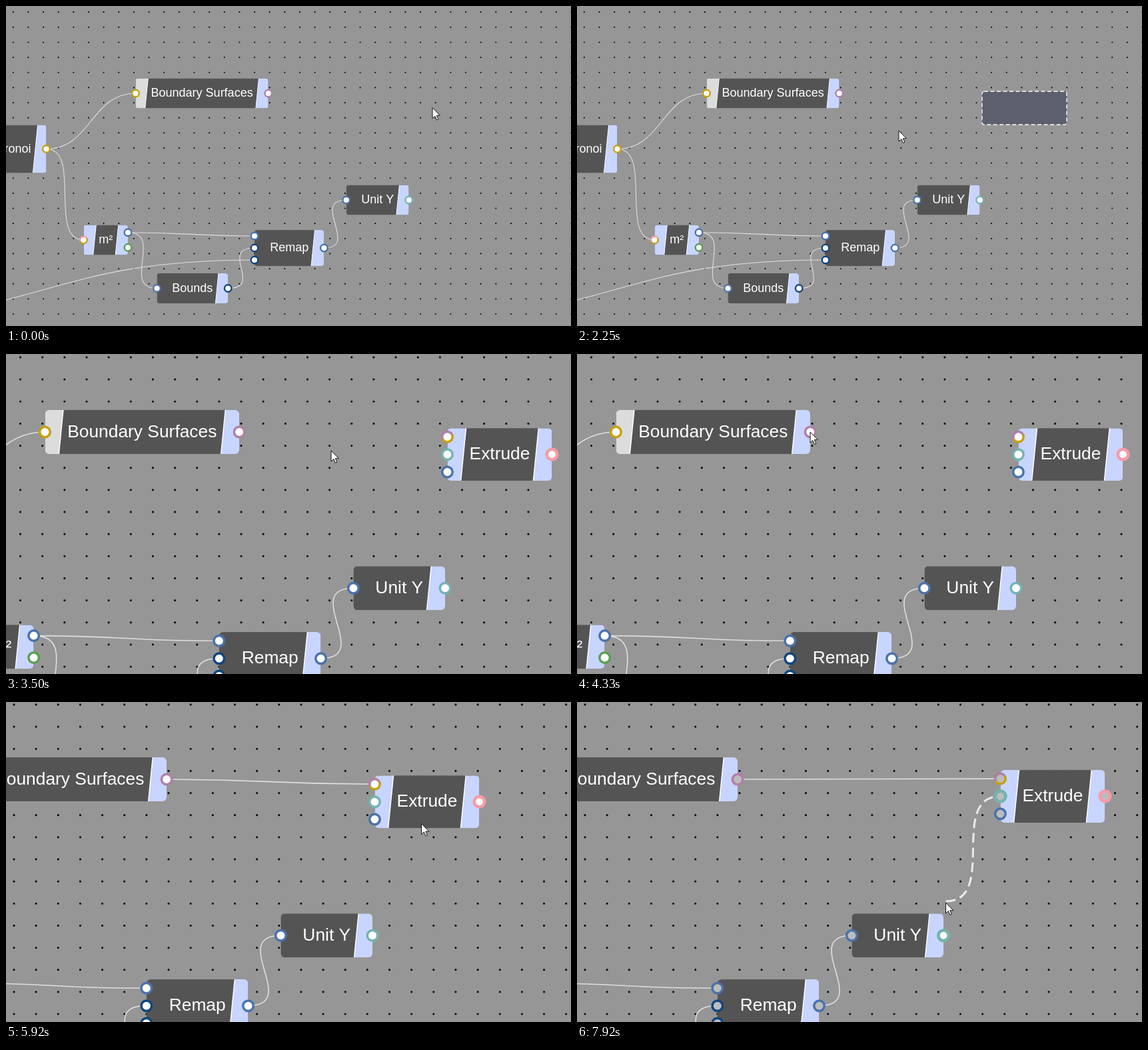
Animation, 848 px wide and 480 px high, one loop 8 s. Source, as an HTML page with a canvas:

```html
<!DOCTYPE html>
<html lang="en">
<head>
<meta charset="utf-8">
<title>Node editor</title>
<style>
  html, body { margin: 0; width: 100%; height: 100%; overflow: hidden; background: #969696; }
  canvas { display: block; }
</style>
</head>
<body>
<canvas id="stage" width="848" height="480"></canvas>
<script>
const ctx = document.getElementById('stage').getContext('2d');
const LOOP = 8000;
const FONT = '"Liberation Sans", Arial, sans-serif';
const BLUE = '#4a72aa', NAVY = '#10457f', GOLD = '#c6a10c', MAUVE = '#b27fa6',
      TEAL = '#74b3ae', GREEN = '#57a051', PINK = '#f59ca6', PANEL = '#c8d5ff', PALE = '#dcdcdc';

// x is the left edge, y the vertical centre; a colour pair is a two-tone port.
const node = (name, x, y, w, h, ins, outs, panel) => ({ name, x, y, w, h, ins, outs, panel });
const voronoi = node('Voronoi', -46.5, 214.5, 107, 72, [], [GOLD]);
const boundary = node('Boundary Surfaces', 194.5, 131, 199.2, 45, [GOLD], [MAUVE], PALE);
const area = node('m²', 116.5, 351, 66.5, 45, [[PINK, GOLD]], [BLUE, GREEN], PANEL);
const bounds = node('Bounds', 226.5, 423.5, 106.7, 45, [BLUE], [NAVY]);
const remap = node('Remap', 373, 363, 104.3, 54, [BLUE, NAVY, NAVY], [BLUE]);
const unitY = node('Unit Y', 510.7, 291, 94, 45, [BLUE], [TEAL]);
const extrude = node('Extrude', 607, 154, 107.3, 54, [[MAUVE, GOLD], TEAL, BLUE], [PINK], PANEL);
const EXTRUDE_HOME = { x: extrude.x, y: extrude.y };

const MENU_ITEMS = ['Absolute', 'Amplitude', 'Angle', 'ArcCosine', 'ArcSED', 'ArcSine', 'ArcTangent',
  'Area', 'Average', 'Boolean', 'BoundarySurfaces', 'Ceil', 'Circle'];

const TIME = { menu: 500, filter: 1250, pick: 1420, created: 2330, connected: 5420 };
const ZOOM_STEPS = [3170, 3250, 3330, 3420];

// time, x, y of the pointer
const POINTER = [
  [80, 640, 152.5], [420, 607.5, 127.5], [1420, 607.5, 127.5], [1830, 483, 187],
  [3170, 483, 187], [3500, 488, 145], [3600, 488, 145], [4170, 350, 117], [4670, 350, 117],
  [5080, 561.5, 103], [5340, 662, 124], [5420, 662, 124], [5580, 789, 279], [5750, 680, 278],
  [5920, 623.5, 182.5], [6170, 623.5, 182.5], [6750, 705.5, 174.5], [7250, 635, 142],
  [7420, 635, 142], [7920, 553.5, 301]
];

const progress = (t, a, b) => Math.min(1, Math.max(0, (t - a) / (b - a)));

function pointerAt(t) {
  const next = POINTER.findIndex(k => k[0] > t);
  if (next < 0) return POINTER[POINTER.length - 1].slice(1);
  if (next === 0) return POINTER[0].slice(1);
  const a = POINTER[next - 1], b = POINTER[next], p = progress(t, a[0], b[0]);
  return [a[1] + (b[1] - a[1]) * p, a[2] + (b[2] - a[2]) * p];
}

function viewAt(t) {
  const scale = 1.1 ** ZOOM_STEPS.filter(s => s <= t).length;
  const pan = progress(t, 5580, 5750);
  return { scale, x: 487.6 * (1 - scale) - 109 * pan, y: 161.2 * (1 - scale) - pan };
}

function portPosition(n, side, i) {
  const count = n[side].length;
  return [side === 'ins' ? n.x : n.x + n.w, n.y + (i - (count - 1) / 2) * n.h / count];
}
const input = (n, i = 0) => portPosition(n, 'ins', i);
const output = (n, i = 0) => portPosition(n, 'outs', i);

function drawGrid(view) {
  const gap = 22.64;
  ctx.fillStyle = '#0c0c0c';
  ctx.beginPath();
  for (let x = 10.8; x * view.scale + view.x < 850; x += gap) {
    for (let y = 9.2; y * view.scale + view.y < 482; y += gap) {
      ctx.moveTo(x + 1.1, y);
      ctx.arc(x, y, 1.1, 0, 7);
    }
  }
  ctx.fill();
}

function drawLink([x1, y1], [x2, y2], dashed) {
  const reach = Math.max(54, (x2 - x1) / 2);
  ctx.save();
  ctx.strokeStyle = dashed ? '#e8e8e8' : '#dedede';
  ctx.lineWidth = dashed ? 2.1 : 1.1;
  if (dashed) ctx.setLineDash([10, 5]);
  ctx.beginPath();
  ctx.moveTo(x1, y1);
  ctx.bezierCurveTo(x1 + reach, y1, x2 - reach, y2, x2, y2);
  ctx.stroke();
  ctx.restore();
}

function drawPort([x, y], color, dim, bold) {
  if (Array.isArray(color)) {
    const blend = ctx.createLinearGradient(x - 2, y - 4, x + 2, y + 4);
    blend.addColorStop(0.35, color[0]);
    blend.addColorStop(0.6, color[1]);
    color = blend;
  }
  ctx.beginPath();
  ctx.arc(x, y, 5.3, 0, 7);
  ctx.fillStyle = dim ? '#bcbcbc' : '#fff';
  ctx.fill();
  ctx.strokeStyle = color;
  ctx.lineWidth = bold ? 3.2 : 2.4;
  ctx.stroke();
}

function drawPanel(n, edge, direction, color) {
  const top = n.y - n.h / 2, bottom = n.y + n.h / 2, lean = n.h * 0.05;
  const inner = edge + direction * 16.5;
  ctx.fillStyle = color;
  ctx.beginPath();
  ctx.moveTo(edge, top);
  ctx.lineTo(inner + lean, top);
  ctx.lineTo(inner - lean, bottom);
  ctx.lineTo(edge, bottom);
  ctx.fill();
  ctx.strokeStyle = '#fff';
  ctx.lineWidth = 1;
  ctx.beginPath();
  ctx.moveTo(inner + lean, top);
  ctx.lineTo(inner - lean, bottom);
  ctx.stroke();
}

function drawNode(n, drag) {
  ctx.save();
  ctx.beginPath();
  ctx.roundRect(n.x, n.y - n.h / 2, n.w, n.h, 4);
  ctx.clip();
  ctx.fillStyle = '#545454';
  ctx.fillRect(n.x, n.y - n.h / 2, n.w, n.h);
  if (n.panel) drawPanel(n, n.x, 1, n.panel);
  drawPanel(n, n.x + n.w, -1, PANEL);
  ctx.restore();

  ctx.fillStyle = '#fff';
  ctx.font = `18px ${FONT}`;
  ctx.textAlign = 'center';
  ctx.fillText(n.name, n.x + n.w / 2, n.y + 5.3);

  for (const side of ['ins', 'outs']) {
    n[side].forEach((color, i) => {
      const is = end => drag && drag[end].node === n && drag[end].side === side && drag[end].i === i;
      drawPort(portPosition(n, side, i), color, drag && !is('to'), is('from') || is('to') || color === PINK);
    });
  }
}

function drawPlaceholder() {
  ctx.save();
  ctx.beginPath();
  ctx.roundRect(608, 128, 127, 50, 3);
  ctx.fillStyle = '#5c5f6c';
  ctx.fill();
  ctx.strokeStyle = '#dcdcdc';
  ctx.lineWidth = 1.8;
  ctx.setLineDash([6, 3.5]);
  ctx.stroke();
  ctx.restore();
}

function drawMenu(t) {
  const typed = 'ext'.slice(0, [830, 920, 1000].filter(s => s <= t).length);
  const items = t < TIME.filter ? MENU_ITEMS : ['Extrude'];
  const left = 607.5, top = 127.5, width = 161, rowsTop = 167.5, row = 24;
  const height = rowsTop - top + row * items.length;

  ctx.save();
  ctx.fillStyle = '#404249';
  ctx.fillRect(left, top, width, height);
  ctx.fillStyle = '#31333b';
  ctx.fillRect(left, rowsTop, width, row);
  ctx.fillStyle = '#fff';
  ctx.fillRect(614, 135, 148, 26);

  ctx.textAlign = 'left';
  ctx.font = `12.75px ${FONT}`;
  ctx.fillStyle = '#222';
  ctx.fillText(typed, 621, 151.5);
  ctx.fillRect(621.5 + ctx.measureText(typed).width, 141, 1, 13);

  ctx.fillStyle = ctx.strokeStyle = '#f2f2f2';
  ctx.lineWidth = 0.35;
  items.forEach((item, i) => {
    ctx.fillText(item, 614, rowsTop + row * i + 15.5);
    ctx.strokeText(item, 614, rowsTop + row * i + 15.5);
  });

  ctx.strokeStyle = '#c4c4c4';
  ctx.lineWidth = 1;
  ctx.strokeRect(left, top, width, height);
  ctx.setLineDash([3, 2]);
  ctx.beginPath();
  items.forEach((_, i) => {
    ctx.moveTo(left, rowsTop + row * i);
    ctx.lineTo(left + width, rowsTop + row * i);
  });
  ctx.stroke();
  ctx.restore();
}

function drawPointer([x, y], isMove) {
  const arrow = new Path2D('M0 0V16.2L3.8 12.6L6.4 18.4L8.9 17.3L6.3 11.7H11.4Z');
  const arm = 'L-1.3 -1.3V-5.5H-4L0 -10L4 -5.5H1.3V-1.3';
  ctx.save();
  ctx.translate(x, y);
  ctx.lineWidth = 1;
  ctx.strokeStyle = '#111';
  ctx.fillStyle = '#fff';
  if (isMove) {
    const cross = new Path2D();
    const shape = new Path2D('M-1.4 -1.4' + arm.replace('L-1.3 -1.3', ''));
    for (let turn = 0; turn < 4; turn++) cross.addPath(shape, new DOMMatrix().rotate(turn * 90));
    ctx.lineWidth = 2;
    ctx.stroke(cross);
    ctx.fill(cross);
    ctx.fillRect(-1.5, -1.5, 3, 3);
  } else {
    ctx.fill(arrow);
    ctx.stroke(arrow);
  }
  ctx.restore();
}

function dragAt(t) {
  if (t >= 4670 && t < TIME.connected) {
    return { from: { node: boundary, side: 'outs', i: 0 }, to: { node: extrude, side: 'ins', i: 0 } };
  }
  if (t >= 7420) {
    return { from: { node: extrude, side: 'ins', i: 1 }, to: { node: unitY, side: 'outs', i: 0 } };
  }
  return null;
}

function draw(t) {
  const view = viewAt(t), pointer = pointerAt(t), drag = dragAt(t);
  const moved = progress(t, 6170, 6750);
  extrude.x = EXTRUDE_HOME.x + 56 * moved;
  extrude.y = EXTRUDE_HOME.y - 5.6 * moved;

  ctx.fillStyle = '#969696';
  ctx.fillRect(0, 0, 848, 480);
  ctx.save();
  ctx.translate(view.x, view.y);
  ctx.scale(view.scale, view.scale);
  drawGrid(view);

  drawLink(output(voronoi), input(boundary));
  drawLink(output(voronoi), input(area));
  drawLink(output(area), input(remap));
  drawLink(output(area), input(bounds));
  drawLink(output(bounds), input(remap, 1));
  drawLink([-260, 470], input(remap, 2));
  drawLink(output(remap), input(unitY));
  if (t >= TIME.connected) drawLink(output(boundary), input(extrude));

  const nodes = [voronoi, boundary, area, bounds, remap, unitY];
  if (t >= TIME.created) nodes.push(extrude);
  for (const n of nodes) drawNode(n, drag);

  if (drag) {
    const start = portPosition(drag.from.node, drag.from.side, drag.from.i);
    const end = [(pointer[0] - view.x) / view.scale, (pointer[1] - 2 - view.y) / view.scale];
    if (drag.from.side === 'outs') drawLink(start, end, true);
    else drawLink(end, start, true);
    const { node: n, side, i } = drag.from;
    drawPort(start, n[side][i], true, true);
  }
  if (t >= TIME.pick && t < TIME.created) drawPlaceholder();
  ctx.restore();

  const menuOpen = t >= TIME.menu && t < TIME.pick;
  if (menuOpen) drawMenu(t);
  drawPointer(pointer, menuOpen);
}

function tick() {
  draw(performance.now() % LOOP);
  requestAnimationFrame(tick);
}
tick();
</script>
</body>
</html>
```
